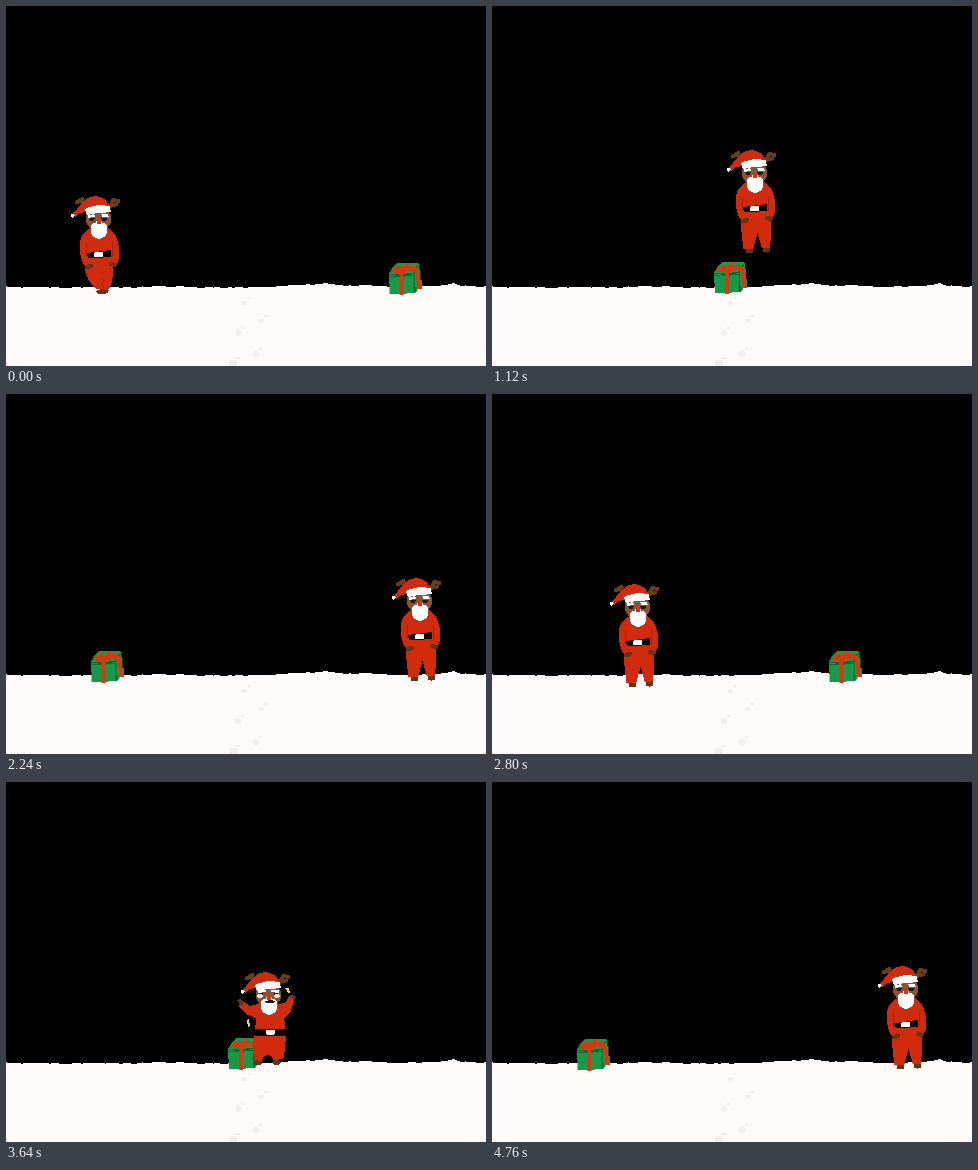
These frames come from a looping animation (480x360 px, 5040 ms). An HTML page:

```html
<!DOCTYPE html>
<html lang="en">
<head>
<meta charset="utf-8">
<title>Snow walk</title>
<style>
  html, body { margin: 0; width: 100%; height: 100%; overflow: hidden; background: #000; }
  svg { display: block; width: 100vw; height: 100vh; shape-rendering: crispEdges; }

  .red { fill: #d12a0c; }
  .skin { fill: #8a5333; }
  .dark { fill: #623616; }
  .white { fill: #fff; }
  .line { fill: none; stroke-linecap: round; stroke-linejoin: round; }
  .antler { stroke: #6b3c18; stroke-width: 4; }
  .crease { stroke: #a92109; stroke-width: 1; }
  .ribbon { stroke: #d8380f; stroke-width: 4; stroke-linecap: butt; }
  .edge { stroke: #0b6a32; stroke-width: 1.3; }

  #walk, #gift, .together, .apart { animation: 2520ms step-end infinite; }
  #lift, .calm, .hurt { animation: 5040ms step-end infinite; }
  #walk { animation-name: walk; }
  #gift { animation-name: slide; }
  .together { animation-name: together; }
  .apart { animation-name: apart; }
  #lift { animation-name: lift; }
  .calm { animation-name: calm; }
  .hurt { animation-name: hurt; }

  @keyframes walk {
    0% { transform: translate(0, 0); }
    11.111% { transform: translate(53px, 0); }
    22.222% { transform: translate(106.5px, -1px); }
    33.333% { transform: translate(144px, 0); }
    44.444% { transform: translate(170px, 0); }
    55.555% { transform: translate(212.5px, -6px); }
    77.777% { transform: translate(267px, -6px); }
    88.888%, 100% { transform: translate(321px, -6px); }
  }
  @keyframes slide {
    0% { transform: translate(382.5px, 0); }
    11.111% { transform: translate(336.5px, 0); }
    22.222% { transform: translate(289px, 0); }
    33.333% { transform: translate(251px, 0); }
    44.444% { transform: translate(222px, -1px); }
    55.555% { transform: translate(180px, 0); }
    77.777% { transform: translate(132px, 0); }
    88.888%, 100% { transform: translate(84.5px, 0); }
  }
  @keyframes together {
    0%, 22.222%, 55.555%, 77.777% { opacity: 1; }
    11.111%, 44.444%, 66.666%, 88.888%, 100% { opacity: 0; }
  }
  @keyframes apart {
    0%, 22.222%, 55.555%, 77.777% { opacity: 0; }
    11.111%, 44.444%, 66.666%, 88.888%, 100% { opacity: 1; }
  }
  @keyframes lift {
    0%, 27.777%, 100% { transform: translate(0, 0); }
    16.666% { transform: translate(0, -46px); }
  }
  @keyframes calm {
    0%, 77.777%, 100% { opacity: 1; }
    72.222% { opacity: 0; }
  }
  @keyframes hurt {
    0%, 77.777%, 100% { opacity: 0; }
    72.222% { opacity: 1; }
  }
</style>
</head>
<body>
<svg viewBox="0 0 480 360" preserveAspectRatio="none">
  <rect width="480" height="360" fill="#000"/>
  <path id="snow" fill="#fffbfb"/>
  <g id="prints" fill="#f3eeee"></g>

  <g id="gift">
    <path fill="#169a4a" d="M0 268L5 260L8 257.500L29 257L31 259L33 279L26.500 287L1 288.500Z"/>
    <path class="line edge" d="M1 268.500L9 269L25.500 267.500L26 286.500M25.500 267.500L30 259M2 270.500L24 269.500"/>
    <path class="line ribbon" d="M12.500 266V288.500"/>
    <path class="line ribbon" stroke-width="3" d="M25.500 260L28.500 267L31 283"/>
    <path fill="#d8380f" d="M3.500 266L5 262L9 259.500L15 260.500L18 257L21 258L20 260.500L26 260L28 263L25 266L21 264L17 267.500L13 265.500L8 267.500Z"/>
    <path class="line" stroke="#7d5a18" d="M9 263.500L12 262.500M17 262L21 261.500M14 265L16 264"/>
  </g>

  <g id="walk"><g id="lift">
    <g class="calm">
      <g class="together">
        <path class="dark" d="M90 285L95 283L103 284L102 287L97 288.500L92 287.500Z"/>
        <path class="red" d="M79 254H108L107 268Q106 280 102 284L91 283Q80 275 79 262Z"/>
        <path class="line crease" d="M96 273L98 275L96 279L98 282"/>
      </g>
      <g class="apart">
        <ellipse class="dark" cx="87.500" cy="291" rx="4" ry="2.300"/>
        <ellipse class="dark" cx="104.500" cy="290" rx="3.600" ry="2.500"/>
        <path class="red" d="M79 254H108.500L109 274L108 288L100 288.500L95.500 273L91 289.500L81.500 289L79.500 272Z"/>
      </g>
      <path class="red" d="M85 222Q93 219 102 222Q109 226 112 236Q114.500 247 112 256L105 260H82L78 259Q72 247 74 235Q77 225 85 222Z"/>
      <path class="line crease" d="M80 237L81 251M107 236L106 250"/>
      <path d="M81 247L105 244V251L82 252.500Z"/>
      <rect class="white" x="88" y="246.300" width="9" height="5" rx="1" transform="rotate(-3 92 249)"/>
      <ellipse class="dark" cx="83" cy="260.500" rx="4.300" ry="2.200" transform="rotate(-22 83 260.500)"/>
      <ellipse class="dark" cx="107" cy="258.500" rx="4.200" ry="2.200" transform="rotate(8 107 258.500)"/>
    </g>

    <g class="hurt">
      <ellipse class="dark" cx="82" cy="280.500" rx="4.200" ry="2.500"/>
      <ellipse class="dark" cx="100.500" cy="280.500" rx="4.200" ry="2.500"/>
      <path class="red" d="M78 253H110L109 268L107 277L97 278Q96 273 92 273Q87 273 86 279L78 278L77 266Z"/>
      <path class="red" d="M82 222H104L110 220L113 214L119 217L115 229L108 236L110 250H79L80 236L70 232L63 224L67 219L74 224Z"/>
      <rect x="78.500" y="247" width="32" height="7"/>
      <rect class="white" x="90" y="248" width="9" height="4.500" rx="1"/>
      <path class="dark" d="M61 218L64 217L68 221L65 224Z"/>
      <path class="dark" d="M113 214L116 212.500L120 215L118 219Z"/>
      <path class="line" stroke="#e8df45" stroke-width="2" d="M109.500 206.500L112 206.500L111.500 208.500L113 210M72.500 238L71.500 240.500L73 241.500L72.500 244"/>
    </g>

    <path class="line antler" d="M80 201L74.500 194M71 196.500L76.500 193M104 201L107 194L112.500 195M106 198.500L110 198.500"/>
    <ellipse class="skin" cx="92.500" cy="213" rx="12.800" ry="12"/>
    <path class="red" d="M79 206L74 207L69 211L67 208Q74 199 80 193.500Q85 189.500 92 190.500Q102 192 104 203Z"/>
    <path class="white" d="M79 203Q91 197 104 200.500L105 206.500Q92 206 81 209Z"/>
    <circle class="white" cx="66.800" cy="209.800" r="1.900"/>

    <g class="calm">
      <path class="white" d="M82 209.500L88 208L89.500 210.500L82 212ZM95 208L102 208.500L103 211.500L96 210.500Z"/>
      <path fill="#22150e" d="M83 212.500L89 211.500L88 214.500L84 214.500ZM95 211.500L101 212.500L100 214.500L96 214.500Z"/>
    </g>
    <g class="hurt">
      <path class="white" d="M82 208H90V210L82 211ZM95 208H103V211L95 210Z"/>
      <path fill="#22150e" d="M82 210.500L90 212L84 213ZM103 210.500L95 212L101 213Z"/>
      <ellipse fill="#f3dfd7" cx="84" cy="214" rx="3.200" ry="2"/>
      <ellipse fill="#f3dfd7" cx="101" cy="214" rx="3.200" ry="2"/>
    </g>

    <path class="white" d="M85 219Q88 216 93 217Q98 216 101 219Q103 232 93 233Q83 232 85 219Z"/>
    <path class="white" d="M90 215H96L97 219H89Z"/>
    <circle cx="93" cy="216" r="2.100" fill="#e52a10"/>
    <path class="hurt" fill="#22150e" d="M89 219L94 218L99 219L98 221L90 221Z"/>
  </g></g>
</svg>

<script>
  // Seeded noise for the ragged snow line
  let seed = 11;
  const rand = () => (seed = (seed * 16807) % 2147483647) / 2147483647;

  const ridge = [
    [0, 281], [50, 281.5], [65, 282], [80, 281], [130, 281.5], [148, 280],
    [185, 280.5], [200, 281.5], [255, 281], [285, 279.5], [310, 278.5],
    [319, 277.3], [330, 279], [345, 279.8], [358, 278.3], [370, 280], [385, 281],
    [425, 280], [440, 279], [448, 277.5], [456, 279.5], [480, 281]
  ];
  const height = x => {
    const i = Math.max(1, ridge.findIndex(p => p[0] >= x));
    const [x0, y0] = ridge[i - 1], [x1, y1] = ridge[i];
    return y0 + (y1 - y0) * (x - x0) / (x1 - x0);
  };
  let line = "M0 360";
  for (let x = 0; x <= 480; x += 4) line += `L${x} ${(height(x) + rand() * 1.4 - 0.7).toFixed(1)}`;
  document.getElementById("snow").setAttribute("d", line + "L480 360Z");

  const prints = [[238.5, 297], [255.5, 315], [232, 327], [250, 348], [227, 357]];
  document.getElementById("prints").innerHTML = prints.map(([x, y], i) => {
    const r = 2.6 + i * 0.35;
    return `<ellipse cx="${x}" cy="${y}" rx="${r}" ry="${r * 0.8}"/>` +
      `<ellipse cx="${x + 4.5}" cy="${y - 5}" rx="${r * 0.6}" ry="1.3"/>`;
  }).join("");
</script>
</body>
</html>
```
